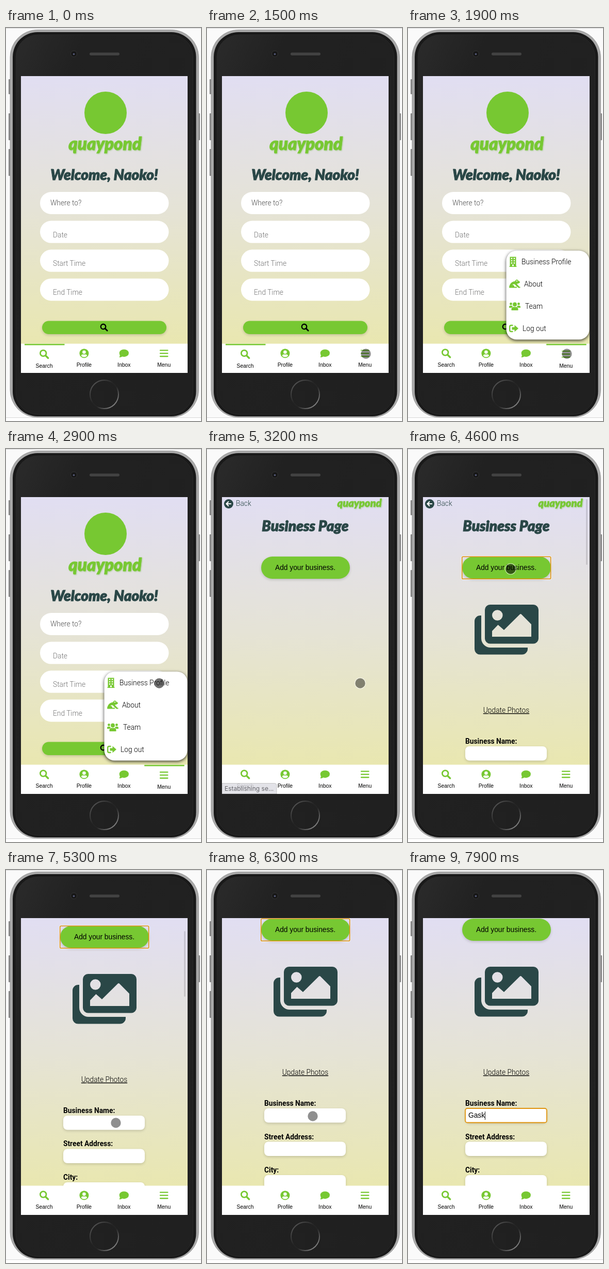
An HTML page that plays this animation: 378x760 px, repeating every 8 s.

```html
<!DOCTYPE html>
<html lang="en">
<head>
<meta charset="utf-8">
<title>Phone demo</title>
<style>
  html, body { margin: 0; width: 100%; height: 100%; overflow: hidden; background: #fff; }
  svg { display: block; }
  text { font: 13.78px "Liberation Sans", Arial, sans-serif; fill: #000; }
  .thin { font: 350 13.78px Roboto, sans-serif; }
  .hint { fill: #757575; }
  .bold { font: 700 13.78px Roboto, sans-serif; }
  .title { font: italic 900 28px Lato, sans-serif; fill: #2a4747; stroke: #2a4747; stroke-width: 1; text-anchor: middle; }
  .brand { font: italic 900 33px Lato, sans-serif; fill: #77c832; stroke: #77c832; stroke-width: .8; text-anchor: middle; filter: drop-shadow(1px 1px 1px rgba(90, 170, 40, .4)); }
  .brand.small { font-size: 20px; stroke-width: .5; }
  .tab { font-size: 10.4px; text-anchor: middle; }
  .status { font: 12px Inter, sans-serif; fill: #66666b; }
  .mid { text-anchor: middle; }
  .soft { filter: drop-shadow(0 2.5px 2.5px rgba(0, 0, 0, .16)); }
  .raised { filter: drop-shadow(0 2px 3px rgba(0, 0, 0, .75)); }
</style>
</head>
<body>
<svg width="378" height="760" viewBox="0 0 378 760">
  <defs>
    <linearGradient id="sky" gradientUnits="userSpaceOnUse" x1="0" y1="93" x2="0" y2="611">
      <stop offset="0" stop-color="#e1def2"/>
      <stop offset=".5" stop-color="#e5e3d6"/>
      <stop offset="1" stop-color="#e9e7b0"/>
    </linearGradient>
    <linearGradient id="ring" x1="0" y1="0" x2="1" y2="1">
      <stop offset=".1" stop-color="#555"/>
      <stop offset=".45" stop-color="#242424"/>
      <stop offset=".58" stop-color="#242424"/>
      <stop offset=".9" stop-color="#8d8d8d"/>
    </linearGradient>
    <linearGradient id="shell" x1="0" y1="0" x2="1" y2="1">
      <stop offset="0" stop-color="#2b2b2b"/>
      <stop offset=".2" stop-color="#212121"/>
      <stop offset="1" stop-color="#202020"/>
    </linearGradient>
    <clipPath id="screen"><rect x="29" y="93" width="323" height="574"/></clipPath>
    <clipPath id="view"><rect x="29" y="93" width="323" height="518"/></clipPath>

    <g id="search" fill="none" stroke="currentColor">
      <circle cx="-1.8" cy="-1.8" r="5.8" stroke-width="2.8"/>
      <path d="M3 3L7.600 7.600" stroke-width="3.400" stroke-linecap="round"/>
    </g>
    <g id="profile">
      <circle r="9" fill="currentColor"/>
      <circle cy="-2.5" r="3.300" fill="#fff"/>
      <path d="M-5.600 4.700C-5 1.600-2.500 1.900 0 2.300 2.500 1.900 5 1.600 5.600 4.700A7.300 7.300 0 0 1-5.600 4.700Z" fill="#fff"/>
    </g>
    <g id="inbox" fill="currentColor">
      <ellipse cy="-.5" rx="9.200" ry="7.200"/>
      <path d="M-8 1.500Q-7.500 5.500-9.200 7.700Q-5.500 7.700-2.500 5.500Z"/>
    </g>
    <path id="menu" d="M-7.200-5.800H7.200M-7.200 0H7.200M-7.200 5.800H7.200" stroke="currentColor" stroke-width="2.300" stroke-linecap="round"/>
    <g id="building">
      <path d="M-7 10V8.500H-6V-9.500H6V8.500H7V10Z" fill="currentColor"/>
      <path d="M-2.500-7.500V4M2.500-7.500V4" stroke="#fff" stroke-width="2.400" stroke-dasharray="2.400 2"/>
      <path d="M-1.500 8.500V5.500H1.500V8.500Z" fill="#fff"/>
    </g>
    <g id="frog">
      <path d="M-10.500 7C-10 0-5-5 1.500-5.500C1.500-9.500 7-9.500 7.500-6L10.500-4.500C11-2 8-1 4.500 0L9.500 5.500H11V7.500H7.500L2 2.500C1 0-3 0-4 2C-1 2 0 4-.5 5.500H4.500V7.500H-9.500Z" fill="currentColor"/>
      <circle cx="4.500" cy="-5.600" r="1.100" fill="#fff"/>
    </g>
    <g id="team" fill="currentColor">
      <circle cx="-7.500" cy="-4.500" r="2.400"/><circle cx="7.500" cy="-4.500" r="2.400"/>
      <path d="M-11 3V1Q-11-1-9-1H-6Q-4.500-1-4 .5L-6.500 3ZM11 3V1Q11-1 9-1H6Q4.500-1 4 .5L6.500 3Z"/>
      <circle cy="-3.500" r="3.900"/>
      <path d="M-6.500 8V5.500Q-6.500 1.500-2.500 1.500H2.500Q6.500 1.500 6.500 5.500V8Z"/>
    </g>
    <g id="logout">
      <path d="M-2.500-6H-5Q-7.800-6-7.800-3.500V3.500Q-7.800 6-5 6H-2.500" fill="none" stroke="currentColor" stroke-width="2.400" stroke-linecap="round"/>
      <path d="M-3.500-2.500H1.500V-6.500L9 0L1.500 6.500V2.500H-3.500Z" fill="currentColor"/>
    </g>
  </defs>

  <rect width="378" height="753" fill="#fafafa"/>
  <path d="M0 .5H378M0 753.500H378" stroke="#d6d6d6"/>

  <g fill="#858585">
    <rect x="5" y="99" width="5" height="29" rx="1"/>
    <rect x="5" y="165" width="5" height="52" rx="1"/>
    <rect x="5" y="234" width="5" height="52" rx="1"/>
    <rect x="371" y="165" width="5" height="52" rx="1"/>
  </g>
  <rect x="8" y="3.500" width="365.500" height="749.500" rx="53" fill="#a8a8a8" stroke="#999" stroke-width=".8"/>
  <rect x="13" y="8" width="355.500" height="743" rx="48" fill="#191919"/>
  <rect x="19" y="13" width="343.500" height="734" rx="43" fill="url(#shell)" stroke="#292929"/>
  <circle cx="131.500" cy="50" r="6" fill="#171717" stroke="#353535"/>
  <circle cx="131.500" cy="50.500" r="1.800" fill="#555a78"/>
  <rect x="162" y="47.500" width="58" height="5.500" rx="2.700" fill="#424242"/>
  <circle cx="190.500" cy="708.500" r="27.500" fill="none" stroke="url(#ring)" stroke-width="2"/>

  <g clip-path="url(#screen)">
    <rect x="29" y="93" width="323" height="574" fill="url(#sky)"/>
    <g id="home">
      <circle cx="193" cy="164" r="41" fill="#77c832"/>
      <text class="brand" x="192" y="236">quaypond</text>
      <text class="title" x="190.500" y="293.500">Welcome, Naoko!</text>
      <g id="pills"></g>
      <rect class="soft" x="70" y="566.500" width="241" height="25.500" rx="12.700" fill="#77c832"/>
      <use href="#search" transform="translate(190 579) scale(.82)" color="#000"/>
    </g>
    <g id="business" clip-path="url(#view)">
      <g id="scroll">
        <circle cx="42" cy="106" r="9" fill="#2a4747"/>
        <path d="M47 106H38M42 101.500L37.500 106L42 110.500" fill="none" stroke="#fff" stroke-width="2"/>
        <text class="thin" x="56" y="110" style="fill:#2a4747">Back</text>
        <text class="brand small" x="295.500" y="112">quaypond</text>
        <text class="title" x="190.500" y="158.500">Business Page</text>
        <rect class="soft" x="105" y="208" width="172" height="43" rx="21.500" fill="#77c832"/>
        <text class="mid" x="190.500" y="234">Add your business.</text>
        <g id="buttonRing" fill="none">
          <rect x="103.500" y="207" width="174.500" height="45.500" rx="3" stroke="#fff" stroke-opacity=".6"/>
          <rect x="104.700" y="208.200" width="172" height="43" rx="2" stroke="#e0940e" stroke-width="1.600"/>
        </g>
        <g id="form">
          <path fill="#2a4747" fill-rule="evenodd" d="M142 322H140A11 11 0 0 0 129 333V387A10.500 10.500 0 0 0 139.500 397.500H221A11 11 0 0 0 232 386.500V384H160A18 18 0 0 1 142 366Z
            M159 301H243A10 10 0 0 1 253 311V366.500A10 10 0 0 1 243 376.500H159A10 10 0 0 1 149 366.500V311A10 10 0 0 1 159 301Z
            M163 321.500A10.300 10.300 0 1 0 183.600 321.500A10.300 10.300 0 1 0 163 321.500Z
            M163 363V352L174.500 340L186 350L217 319.500Q218.300 318.500 219.600 319.500L239 339V363Z"/>
          <text class="thin mid" x="190.500" y="510" text-decoration="underline">Update Photos</text>
          <g id="fields"></g>
          <rect id="fieldRing" x="111" y="575" width="158" height="27.500" rx="4" fill="#fff" stroke="#e0940e" stroke-width="1.800"/>
          <text id="entry" x="117" y="593"></text>
          <path id="caret" d="M0 581V597" stroke="#000" stroke-width=".9"/>
        </g>
      </g>
      <rect id="bar" x="345" y="97" width="3" height="127" rx="1.500" fill="#000" fill-opacity=".12"/>
    </g>

    <g id="popup">
      <rect class="raised" x="190.500" y="430.500" width="161" height="172" rx="20" fill="#fff"/>
    </g>

    <rect x="29" y="610.500" width="323" height="57" fill="#fff"/>
    <rect id="mark" y="610.800" width="77.500" height="2.600" fill="#77c832"/>
    <g id="tabs"></g>
    <g id="status">
      <path d="M29 646.500H131Q135 646.500 135 650.500V667H29Z" fill="#dfdfe4" fill-opacity=".85" stroke="#bbb" stroke-width=".8"/>
      <text class="status" x="34" y="661">Establishing se...</text>
    </g>
    <g id="pointer">
      <circle r="10.300" fill="none" stroke="#fff" stroke-opacity=".55" stroke-width="1.200"/>
      <circle id="dot" r="9.700"/>
    </g>
  </g>
</svg>
<script>
  const LOOP = 8000;
  const $ = id => document.getElementById(id);
  const show = (id, on) => $(id).style.display = on ? '' : 'none';
  const add = (id, html) => $(id).insertAdjacentHTML('beforeend', html);
  const between = (t, a, b) => t >= a && t < b;

  [['Where to?', 86, 343], ['Date', 91, 405], ['Start Time', 91, 460], ['End Time', 91, 516]]
    .forEach(([label, x, y], i) => add('pills',
      `<rect x="66" y="${317 + i * 55.8}" width="249.500" height="43" rx="21.500" fill="#fff"/>
       <text class="thin hint" x="${x}" y="${y}" ${i ? '' : 'style="fill:#505050"'}>${label}</text>`));

  ['Business Name:', 'Street Address:', 'City:'].forEach((label, i) => {
    const y = 570 + i * 64.5;
    add('fields', `<text class="bold" x="111" y="${y}">${label}</text>
      <rect class="soft" x="111" y="${y + 5}" width="158" height="27.500" rx="8" fill="#fff"/>`);
  });

  [['building', 'Business Profile', 203.5, 220], ['frog', 'About', 206.5, 225],
   ['team', 'Team', 207, 227], ['logout', 'Log out', 205, 222]]
    .forEach(([icon, label, ix, x], i) => {
      const y = 452 + i * 43;
      add('popup', `<use href="#${icon}" x="${ix}" y="${y}" color="#77c832"/>
        <text class="thin" x="${x}" y="${y + 5}">${label}</text>`);
    });

  const tabs = ['Search', 'Profile', 'Inbox', 'Menu'];
  tabs.forEach((label, i) => add('tabs', `<g id="tab${i}">
    <use href="#${label.toLowerCase()}" x="${74 + i * 77.4}" y="629.200" color="#77c832"/>
    <text class="tab" x="${74 + i * 77.4}" y="655">${label}</text></g>`));

  // Rows: time, then values
  const path = [[1100, 304, 672], [1400, 308, 630], [1900, 308, 630], [2700, 297, 453],
    [3700, 297, 453], [4400, 199, 232], [4700, 199, 232], [5200, 213, 489],
    [5700, 213, 489], [6300, 205, 476]];
  const scrolls = [[4800, 0], [5300, 100], [5800, 114]];
  const presses = [[1550, 1750], [2850, 3000], [4400, 4700], [6450, 6600]];
  const typing = [[7100, 'G'], [7300, 'Ga'], [7500, 'Gas'], [7700, 'Gask']];

  function at(rows, t) {
    const next = rows.findIndex(r => r[0] > t);
    if (next < 0) return rows[rows.length - 1].slice(1);
    if (!next) return rows[0].slice(1);
    const a = rows[next - 1], b = rows[next];
    const p = (t - a[0]) / (b[0] - a[0]);
    const e = p * p * (3 - 2 * p);
    return a.slice(1).map((v, i) => v + (b[i + 1] - v) * e);
  }

  function draw(t) {
    const home = t < 3000;
    const selected = t < 1700 ? 0 : home ? 3 : -1;
    const focused = t >= 6500;
    show('home', home);
    show('business', !home);
    show('popup', between(t, 1700, 3000));
    show('status', between(t, 3000, 3800));
    show('form', t >= 4500);
    show('buttonRing', between(t, 4500, 6500));
    show('fieldRing', focused);
    show('mark', selected >= 0);
    $('mark').setAttribute('x', 36 + Math.max(selected, 0) * 77.4);
    tabs.forEach((_, i) => $('tab' + i).setAttribute('transform', `translate(0 ${i === selected ? 1.5 : 0})`));

    const [y] = at(scrolls, t);
    $('scroll').setAttribute('transform', `translate(0 ${-y})`);
    show('bar', between(t, 4500, 6300));
    $('bar').setAttribute('y', 97 + y * .21);
    $('bar').setAttribute('opacity', Math.min(1, Math.max(0, (6300 - t) / 300)));

    const typed = typing.filter(row => t >= row[0]).pop();
    $('entry').textContent = typed ? typed[1] : '';
    show('caret', focused);
    if (focused) {
      const end = 117 + (typed ? $('entry').getComputedTextLength() : 0);
      $('caret').setAttribute('transform', `translate(${end + .3} 0)`);
    }

    const [px, py] = at(path, t);
    const pressed = presses.some(([a, b]) => between(t, a, b));
    show('pointer', between(t, 1100, 7000));
    $('pointer').setAttribute('transform', `translate(${px} ${py})`);
    $('dot').setAttribute('fill-opacity', pressed ? .56 : .44);
  }

  const start = performance.now();
  function tick() {
    draw((performance.now() - start) % LOOP);
    requestAnimationFrame(tick);
  }
  tick();
</script>
</body>
</html>
```
